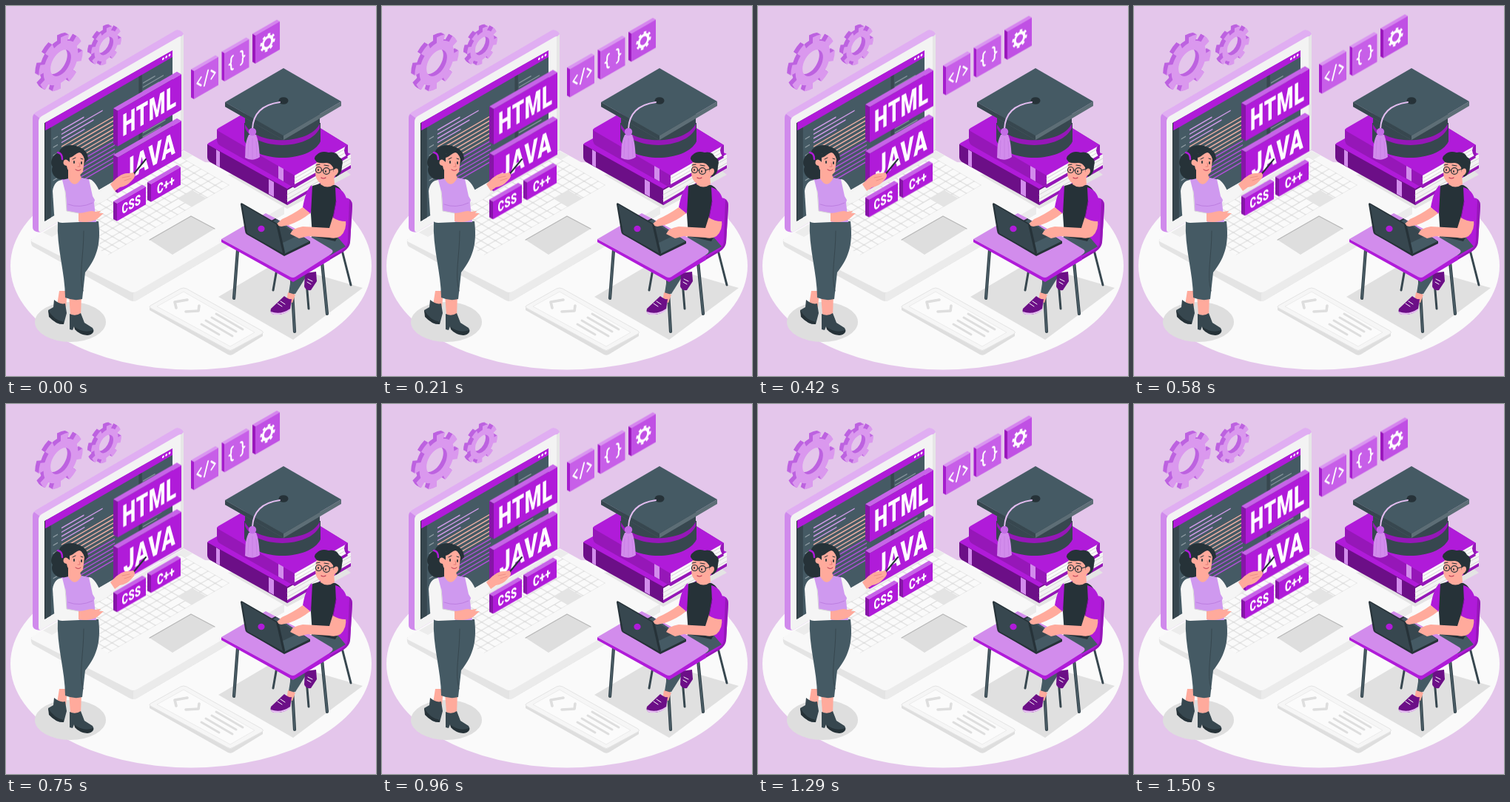
Recreate the animation shown at these times as an HTML page. Size 500 px wide and 500 px high, loop 1540 ms.

```html
<!DOCTYPE html>
<html lang="en">
<head>
<meta charset="utf-8">
<title>Learning to code</title>
<style>
  html, body { margin: 0; width: 100%; height: 100%; overflow: hidden; background: #e4c6eb; }
  svg { display: block; width: 100vw; height: 100vh; }
  text { font-family: Roboto, sans-serif; font-weight: 800; fill: #fff; text-anchor: middle; letter-spacing: .03em; }
  .lift { animation: lift 1540ms linear infinite; }
  @keyframes lift { 50% { transform: translateY(-10px); } }
  .line { fill: none; stroke-linecap: round; stroke-linejoin: round; }
  .dark { fill: #455a64; } .deep { fill: #37474f; } .ink { fill: #263238; }
  .skin { fill: #ffaa9c; } .white { fill: #fafafa; }
  .main { fill: #b01bd9; } .mid { fill: #9617b8; } .dim { fill: #6c0f87; } .soft { fill: #d28cec; }
</style>
</head>
<body>
<svg viewBox="0 0 500 500" xmlns="http://www.w3.org/2000/svg">
  <defs>
    <g id="gear" fill="none">
      <circle r="21.5" stroke-width="11"/>
      <circle r="30" stroke-width="9" pathLength="16" stroke-dasharray="1 1"/>
    </g>
    <pattern id="keys" width="11.5" height="11" patternUnits="userSpaceOnUse">
      <rect width="11.5" height="11" fill="#dedede"/>
      <rect x=".6" y=".6" width="10.2" height="9.7" rx="1.2" fill="#fafafa"/>
    </pattern>
    <clipPath id="glass"><path d="M52 158 225 60V191L52 291Z"/></clipPath>
  </defs>

  <rect width="500" height="500" fill="#e4c6eb"/>
  <ellipse cx="250" cy="351" rx="244" ry="140.5" class="white"/>
  <g id="gears"></g>

  <!-- big laptop -->
  <path d="M34 315 172 387 376 270V281L178 397Q172 401 166 397L36 325Q33 322 34 315Z" fill="#e4e4e4"/>
  <path d="M172 388 376 270V281L178 397Q175 399 172 399Z" fill="#ebebeb"/>
  <path d="M36 314 240 195 376 270 178 385Q172 389 166 385L36 319Q32 317 36 314Z" fill="#f8f8f8"/>
  <path d="M50 306 240 196 252 202 62 312Z" fill="#ececec"/>
  <g transform="matrix(-.866 .5 -.866 -.5 302 242)">
    <rect width="189" height="77" fill="url(#keys)"/>
    <rect x="34.5" y="11" width="46" height="10.5" rx="1" fill="#fafafa" stroke="#dedede"/>
    <rect x="36" y="0" width="23" height="22" fill="#e4e4e4"/>
  </g>
  <path d="M194 316 250 284 282 301 225 336Z" fill="#dedede"/>
  <path d="M194 316 250 284 282 301" class="line" stroke="#b8b8b8" stroke-width="1.3"/>

  <path d="M36 151Q36 146 41 143L229 33Q233 31 238 35L240 38V194L48 305Q44 307 39 304Q36 302 36 298Z" fill="#e0aef2"/>
  <path d="M36 151Q36 148 38 146L46 152V305Q43 306 39 304Q36 302 36 298Z" fill="#d08aec"/>
  <path d="M44 156Q44 152 48 149L233 42Q239 39 239 45V194L48 305Q44 306 44 302Z" fill="#f3f3f3"/>
  <path d="M240 38V194L236 196V42Z" fill="#e6e6e6"/>
  <g clip-path="url(#glass)">
    <path d="M52 158 225 60V191L52 291Z" class="dark"/>
    <path d="M52 158 55 156V290L52 291Z" class="ink"/>
    <g transform="matrix(.866 -.5 0 1 53 157.4)">
      <rect width="200" height="11" class="main"/>
      <rect x="0" y="11" width="9" height="125" class="deep"/>
      <rect x="146" y="11" width="5" height="125" class="deep"/>
      <g id="code" class="line" stroke-width="1.6"></g>
      <g fill="#fff"><circle cx="184" cy="6" r="1.6"/><circle cx="189" cy="6" r="1.6"/><circle cx="194" cy="6" r="1.6"/></g>
    </g>
  </g>

  <!-- books and cap -->
  <path d="M300 228 380 274 466 228 440 208Z" fill="#e4e4e4"/>
  <path d="M272 187 345 146 466 209V219L380 269 276 211Q272 208 272 204Z" class="dim"/>
  <path d="M380 249 466 200V218L380 266Z" fill="#f3f3f3"/>
  <path d="M380 255 466 206M380 261 466 212" class="line" stroke="#d5d5d5"/>
  <path d="M380 265 466 215V219L380 269Z" class="mid"/>
  <path d="M274 185 345 146 466 200 380 247 274 188Q271 187 274 185Z" class="main"/>
  <path d="M284 194 289 197V218L284 215ZM355 234 362 238V258L355 254Z" class="soft"/>
  <path d="M285 167 358 124 462 188V203L390 246 290 189Q285 186 285 181Z" class="mid"/>
  <path d="M390 227 460 188Q454 194 460 203L390 242Z" class="white"/>
  <path d="M390 233 457 194M390 238 457 199" class="line" stroke="#d5d5d5"/>
  <path d="M287 165 358 124 462 188 390 229 287 169Q284 167 287 165Z" class="main"/>
  <path d="M460 202 390 241V246L462 205Z" class="mid"/>
  <path d="M368 216 375 220V237L368 233Z" class="soft"/>
  <path d="M322 158V182C336 213 411 212 425 183V158Z" class="deep"/>
  <path d="M323 155V165C338 196 410 195 424 165V155Z" class="mid"/>
  <path d="M323 148V160C338 189 410 188 424 159V146Z" class="deep"/>
  <path d="M296 130 375 175 453 129V135L375 181 296 136Z" fill="#5d6e76"/>
  <path d="M296 130 375 175V181L296 136Z" class="deep"/>
  <path d="M296 130 375 84 453 129 375 175Z" class="dark"/>
  <ellipse cx="375" cy="128" rx="6.5" ry="4.8" class="ink"/>
  <path d="M370 130C348 133 334 143 333 166" class="line" stroke="#e3bdf0" stroke-width="2"/>
  <path d="M328 174C322 186 324 196 323 205Q333 211 343 204C342 194 342 184 338 174Z" class="soft"/>
  <path d="M328 182 327 204M333 179V207M338 183 339 204" class="line" stroke="#c47ce2" stroke-width=".7"/>
  <circle cx="333" cy="170" r="5.2" fill="#c46de6"/>

  <!-- code plate -->
  <path d="M194 406V411L300 471Q304 473 308 470L347 446V441Z" fill="#dedede"/>
  <path d="M195 405 236 382Q240 380 244 382L346 439Q349 441 346 443L307 464Q303 467 299 464L195 408Q193 406 195 405Z" fill="#f6f6f6" stroke="#e4e4e4"/>
  <path d="M204 406 240 386 336 441 303 460Z" fill="#fbfbfb" stroke="#ececec"/>
  <g class="line" stroke="#dedede" stroke-width="3.6" stroke-linejoin="miter">
    <path d="M245 397 228 400 230 408M243 413 260 412 261 405"/>
    <path d="M284 416 320 437M278 421 311 440M270 425 306 446M264 430 288 444" stroke-width="3"/>
  </g>

  <g class="lift" id="tiles"></g>

  <!-- woman -->
  <ellipse cx="87" cy="427" rx="48" ry="27" fill="#dedede"/>
  <path d="M72 385H83L81 407 69 404Z" class="skin"/>
  <path d="M85 390H102L101 419 87 417Z" class="skin"/>
  <path d="M65 397Q73 404 80 402L82 415 78 430Q68 431 59 420L57 411 64 407Z" class="deep"/>
  <path d="M57 411Q65 425 78 427V430Q67 430 58 420Z" class="ink"/>
  <path d="M86 416Q94 420 101 415L106 428 117 435Q121 441 114 444Q103 446 94 437L92 433 90 438 86 437Z" class="deep"/>
  <path d="M92 433Q104 443 118 438Q118 444 110 445Q99 444 93 437Z" class="ink"/>
  <path d="M70 291H125C128 318 125 338 107 360L103 396Q92 399 80 394C80 360 68 326 70 291Z" class="dark"/>
  <path d="M105 304C105 338 98 364 104 385" class="line" stroke="#37474f"/>
  <path d="M97 190C87 185 73 190 72 197C61 202 59 213 63 217C59 226 68 236 77 234C90 237 99 228 100 219L111 207C111 198 105 192 97 190Z" class="ink"/>
  <path d="M84 217 100 220 101 239Q93 246 84 237Z" class="skin"/>
  <path d="M86 200Q101 191 106 207L104 224Q99 231 92 228Q83 225 82 216Q76 215 78 209Q81 205 86 211Z" class="skin"/>
  <path d="M84 205C90 206 95 197 101 198Q106 200 107 210Q111 199 103 193L89 193Z" class="ink"/>
  <path d="M70 198Q76 199 76 207" class="line" stroke="#b01bd9" stroke-width="2.4"/>
  <g class="line" stroke="#263238">
    <path d="M90 207 94 205M101 206 104 207"/>
    <path d="M92 210V212M102 211V213" stroke-width="1.8"/>
    <path d="M99 212 100 217H97" stroke="#e27c76"/>
    <path d="M94 221Q98 224 101 221" stroke="#b73550"/>
  </g>
  <path d="M76 235 85 233Q94 246 102 232L116 235 123 249 119 266 122 292H76Z" fill="#cf99ef"/>
  <path d="M84 233Q93 249 102 232L99 228H86Z" class="skin"/>
  <path d="M84 268Q100 274 117 266" class="line" stroke="#b878dc" stroke-width=".8"/>
  <path d="M76 235Q65 236 63 250L65 281Q66 293 76 293L99 292 98 280 82 277 81 255Z" fill="#f5f5f5"/>
  <path d="M80 250 82 277 98 280" class="line" stroke="#d7d7d7"/>
  <path d="M98 280C108 280 114 275 120 278L128 277 126 280 132 280 123 288Q111 294 98 291Z" class="skin"/>
  <path d="M112 234Q120 235 127 252L141 240 148 250Q137 264 123 267L117 257Z" fill="#f5f5f5"/>
  <path d="M161 241 189 207" class="line" stroke="#263238" stroke-width="2"/>
  <path d="M141 241C149 232 157 225 166 226L172 225Q177 229 170 236Q163 244 154 245L147 250Z" class="skin"/>
  <path d="M157 232 167 230M160 236 169 233" class="line" stroke="#e88980" stroke-width=".8"/>

  <!-- student -->
  <path d="M287 393 365 347 482 381 388 451Z" fill="#e0e0e0"/>
  <g class="line" stroke="#37474f" stroke-width="3">
    <path d="M367 350 361 384M405 360 409 409M454 330 466 377"/>
    <path d="M313 330 308 395M427 346 434 416M386 370 390 440" stroke-width="4.2"/>
    <path d="M313 330 308 395M427 346 434 416M386 370 390 440" stroke="#5b6f79" stroke-width="1"/>
  </g>
  <path d="M386 362H408L391 389 382 388Z" class="dark"/>
  <path d="M381 387 391 390 387 401 379 399Z" class="skin"/>
  <path d="M376 392Q382 397 386 396L384 410Q377 418 362 417Q356 415 358 409Z" class="dim"/>
  <path d="M358 413Q371 418 384 409V411Q376 418 362 417Q358 416 358 413Z" fill="#e4bdf0"/>
  <path d="M404 361 419 359 420 372 412 384Q405 385 403 379Z" class="dim"/>
  <path d="M367 402 373 406M371 399 377 403M408 369 414 372M407 373 412 376" class="line" stroke="#fff"/>
  <path d="M449 261Q467 255 468 269L465 319Q464 327 456 332L388 372 388 366 438 335Z" class="main"/>
  <path d="M464 261Q468 264 468 270L465 319Q464 327 456 332L388 372V370L453 331Q462 326 462 317Z" class="mid"/>
  <path d="M414 309 448 312 459 325 438 337 405 330Z" class="dark"/>
  <path d="M413 242Q405 249 401 272L411 281 420 260Z" class="main"/>
  <path d="M414 243 425 240 445 242Q456 247 455 260L454 302 445 318 414 311 412 281Z" class="ink"/>
  <path d="M427 229 443 228 444 241Q434 248 425 241Z" class="skin"/>
  <path d="M420 209Q430 204 444 210L450 218 443 233Q435 243 426 240Q418 236 418 224Z" class="skin"/>
  <path d="M420 211Q414 205 420 201Q426 195 436 198Q446 196 450 204Q457 207 454 217Q454 227 446 231L443 225 442 218Q438 211 432 212Q425 213 420 211Z" class="ink"/>
  <path d="M443 221Q449 217 449 224Q447 230 443 229Z" class="skin"/>
  <g class="line" stroke="#263238" stroke-width="1.2">
    <circle cx="422.5" cy="221.5" r="4"/><circle cx="433" cy="223" r="4.4"/>
    <path d="M426.5 222H428.5M437 222 444 220M419 215 424 214M430 215 436 216"/>
    <path d="M422 221V222M432 223V224" stroke-width="1.8"/>
    <path d="M426 232Q429 234 432 232" stroke="#b73550"/>
  </g>
  <path d="M291 315V319L388 373 438 343V337L388 367Z" class="main"/>
  <path d="M291 315 351 280 410 311 440 329Q444 332 438 336L391 366Q388 368 384 366Z" class="soft"/>
  <path d="M325 308 364 287 411 318V321L376 338Z" class="ink"/>
  <path d="M335 304 366 288 410 318 376 335Z" class="dark"/>
  <path d="M352 304 371 294 395 310 374 320Z" class="deep"/>
  <path d="M401 272Q387 282 373 288L364 296 372 298 382 296Q399 290 411 280Z" class="skin"/>
  <path d="M317 268Q317 265 320 267L365 293Q368 295 369 298L377 333Q377 337 373 335L326 309Q323 307 323 304Z" class="ink"/>
  <path d="M319 268 365 295 374 334 326 307Z" class="deep"/>
  <ellipse cx="345" cy="301" rx="4.6" ry="4.2" class="main"/>
  <path d="M442 284 459 288Q461 303 452 311Q446 315 437 313L408 311 396 314 384 308Q387 300 401 298L437 300Z" class="skin"/>
  <path d="M445 245Q461 249 462 272L459 291Q449 291 442 286L446 266Z" class="main"/>
  <path d="M446 264 442 286" class="line" stroke="#7d129c"/>
</svg>
<script>
  const put = (id, html) => { document.getElementById(id).innerHTML = html; };
  const SLOPE = .577;

  // Slab facing lower left; x, y is the top left corner of its face.
  function tile(x, y, w, h, d, [face, top, side], inner) {
    const up = w * SLOPE, back = d * SLOPE;
    return `<path d="M${x} ${y}l${w} ${-up}l${-d} ${-back}l${-w} ${up}z" fill="${top}"/>
      <path d="M${x} ${y}v${h}l${-d} ${-back}v${-h}z" fill="${side}"/>
      <path d="M${x} ${y}l${w} ${-up}v${h}l${-w} ${up}z" fill="${face}"/>
      <g transform="translate(${x + w / 2} ${y + (h - up) / 2})">${inner}</g>`;
  }

  const label = (s, size, squeeze) =>
    `<text transform="matrix(${squeeze} ${-squeeze * SLOPE} 0 1 0 0)" y="${size * .355}" font-size="${size}">${s}</text>`;
  const icon = d =>
    `<path transform="matrix(.866 -.5 0 1 0 0)" d="${d}" class="line" stroke="#fff" stroke-width="2.4"/>`;
  const cog = (x, y, k, color) =>
    `<use href="#gear" transform="matrix(${.866 * k} ${-.5 * k} 0 ${k} ${x} ${y})" stroke="${color}"/>`;

  const bold = ['#b01bd9', '#c764e8', '#8615a7'];
  const pale = ['#c75fe8', '#d996f0', '#a51dcd'];
  put('tiles',
    tile(151, 142, 86, 48, 6, bold, label('HTML', 41, .63)) +
    tile(151, 205, 86, 48, 6, bold, label('JAVA', 41, .66)) +
    tile(196, 241, 40, 24, 5, bold, label('C++', 19, .7)) +
    tile(150, 267, 39, 24, 5, bold, label('CSS', 19, .68)) +
    tile(254, 88, 33, 38, 4, pale, icon('M-8-5-14 0-8 6M8-6 14 0 8 5M3-9-3 9')) +
    tile(295.5, 64, 33, 38, 4, pale,
      icon('M-6-9Q-9-9-9-5V-3Q-9 0-12 0Q-9 0-9 3V5Q-9 9-6 9M6-9Q9-9 9-5V-3Q9 0 12 0Q9 0 9 3V5Q9 9 6 9')) +
    tile(337, 40, 33, 38, 4, ['#c050e4', '#d585ee', '#9a18bc'], cog(0, 0, .34, '#fff')));

  const thickGear = (x, y, k) => {
    let s = '';
    for (let d = 5; d > 0; d--) s += cog(x - d, y - d * SLOPE, k, '#bd62e0');
    return s + cog(x, y, k, '#da98ee');
  };
  put('gears', thickGear(74, 77, 1) + thickGear(135.5, 54, .69));

  const row = (x, y, w, color) => `<path d="M${x} ${y}h${w}" stroke="${color}"/>`;
  let code = '';
  for (let i = 0; i < 16; i++) {
    const color = i < 4 ? '#cf9ae8' : i < 10 ? '#f0b0a4' : '#b04fd8';
    const y = 23 + i * 5.6;
    code += row(26, y, i < 4 ? 34 + i * 29 % 43 : 82, color);
    if (i % 2) code += row(13, y, 6, '#8c9aa1');
    code += row(153, y, 18 + i * 13 % 20, '#7f8e96');
  }
  put('code', code);
</script>
</body>
</html>
```
